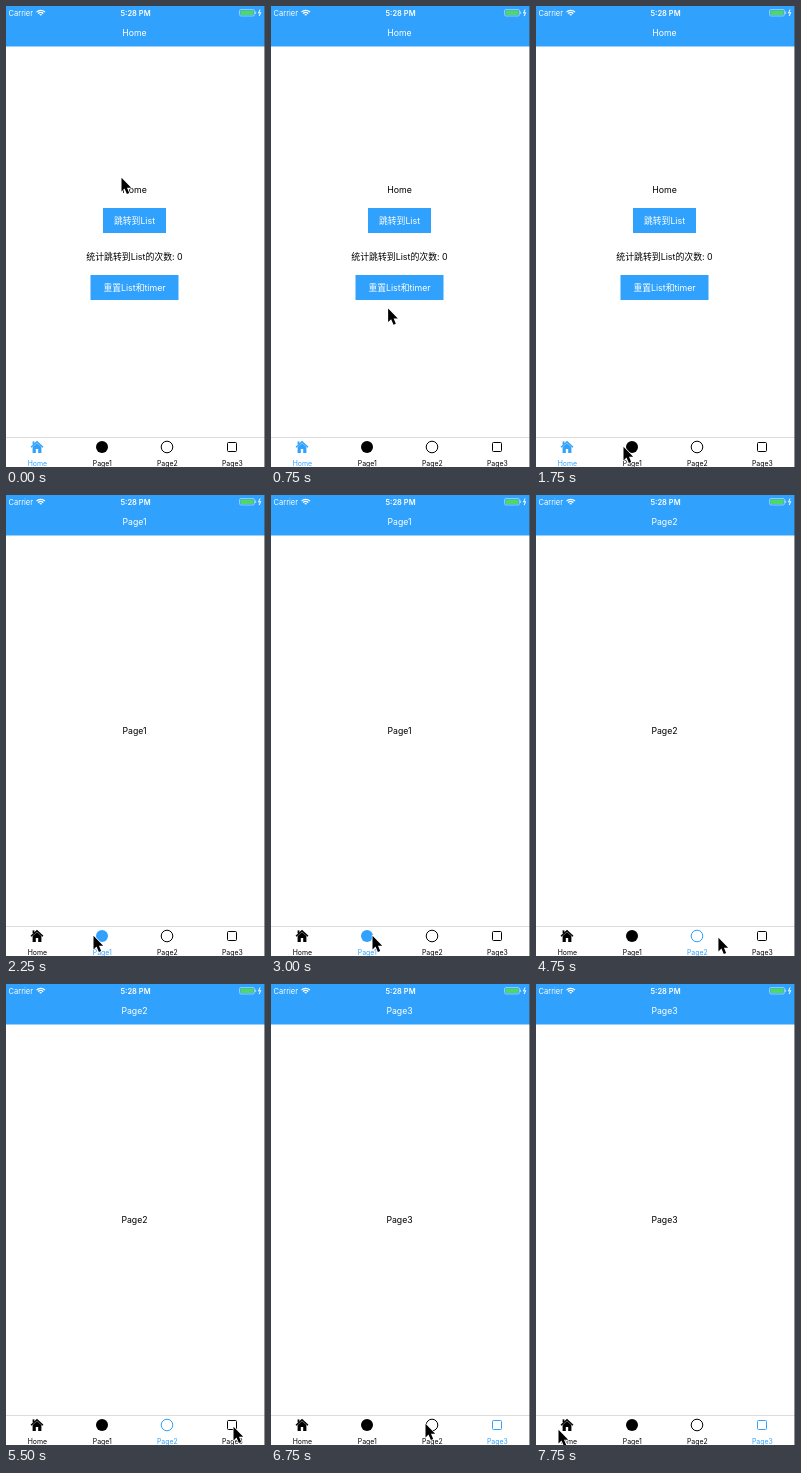
Recreate the animation shown at these times as an HTML page with a canvas. Size 259 px wide and 461 px high, loop 8 s.

```html
<!DOCTYPE html>
<html lang="zh">
<head>
<meta charset="utf-8">
<title>Tab navigation</title>
<style>
html, body { margin: 0; width: 100%; height: 100%; overflow: hidden; background: #fff; }
canvas { display: block; width: 259px; height: 461px; }
</style>
</head>
<body>
<canvas id="stage"></canvas>
<script>
const W = 259, H = 461, LOOP = 8000, STEP = 250;
const BLUE = '#30a1fc', BLACK = '#000', WHITE = '#fff';
const FONT = 'Inter, "Noto Sans CJK SC", "Noto Sans CJK", sans-serif';
const TABS = ['Home', 'Page1', 'Page2', 'Page3'];
const TAB_STARTS = [0, 2250, 4000, 6000];

// The pointer rests between glides; each one eases out to its end point.
const REST = { x: 114, y: 170 };
const GLIDES = [
  { from: 0, to: 250, x: 134, y: 215 },
  { from: 500, to: 1500, x: 86, y: 439 },
  { from: 2750, to: 3000, x: 100, y: 439 },
  { from: 3000, to: 3500, x: 153, y: 441 },
  { from: 4500, to: 5500, x: 226, y: 441 },
  { from: 6500, to: 6750, x: 153, y: 438 },
  { from: 6750, to: 7000, x: 61, y: 438 },
  { from: 7250, to: 7750, x: 21, y: 444 }
];

const canvas = document.getElementById('stage');
const ctx = canvas.getContext('2d');
const dpr = window.devicePixelRatio || 1;
canvas.width = Math.round(W * dpr);
canvas.height = Math.round(H * dpr);

const easeOut = u => Math.sin(Math.min(Math.max(u, 0), 1) * Math.PI / 2);

function pointerAt(t) {
  return GLIDES.reduce((p, g) => {
    const k = easeOut((t - g.from) / (g.to - g.from));
    return { x: p.x + (g.x - p.x) * k, y: p.y + (g.y - p.y) * k };
  }, REST);
}

function rect(x, y, w, h, color) {
  ctx.fillStyle = color;
  ctx.fillRect(x, y, w, h);
}

function text(str, x, y, size, color, align = 'center', weight = 400) {
  ctx.font = `${weight} ${size}px ${FONT}`;
  ctx.textAlign = align;
  ctx.fillStyle = color;
  ctx.fillText(str, x, y);
}

function line(...points) {
  ctx.beginPath();
  points.forEach(([x, y]) => ctx.lineTo(x, y));
}

function circle(x, y, r) {
  ctx.beginPath();
  ctx.arc(x, y, r, 0, Math.PI * 2);
}

function wifi(x, y) {
  ctx.strokeStyle = WHITE;
  ctx.lineWidth = 1.3;
  for (let r = 1.3; r < 6; r += 2.2) {
    ctx.beginPath();
    ctx.arc(x, y, r, -Math.PI * 0.76, -Math.PI * 0.24);
    ctx.stroke();
  }
}

function battery(x, y) {
  ctx.strokeStyle = '#b4dcff';
  ctx.lineWidth = 0.7;
  ctx.beginPath();
  ctx.roundRect(x, y, 15, 6.5, 1.5);
  ctx.stroke();
  rect(x + 1, y + 1, 13, 4.5, '#4fd964');
  rect(x + 15.7, y + 2, 0.9, 2.5, '#b4dcff');
  ctx.strokeStyle = WHITE;
  ctx.lineWidth = 1;
  line([x + 20.6, y], [x + 19, y + 3.6], [x + 21.2, y + 3.1], [x + 19.6, y + 6.6]);
  ctx.stroke();
}

function header(title) {
  rect(0, 0, W, 40.5, BLUE);
  text('Carrier', 2.5, 10, 7.5, WHITE, 'left');
  wifi(34.7, 10);
  text('5:28 PM', 129.5, 10, 7.5, WHITE, 'center', 600);
  battery(233.5, 3.5);
  text(title, 128.5, 30, 8.7, WHITE);
}

function button(label, y, w) {
  rect(128.5 - w / 2, y, w, 25, BLUE);
  text(label, 128.5, y + 15.5, 8.8, WHITE);
}

function homePage() {
  text('Home', 128.5, 186.5, 8.8, BLACK);
  button('跳转到List', 202, 63);
  text('统计跳转到List的次数: 0', 128.5, 254, 8.9, BLACK);
  button('重置List和timer', 269, 88);
}

function house() {
  ctx.lineWidth = 1.4;
  line([-6, 0.2], [0, -5.3], [6, 0.2]);
  ctx.stroke();
  ctx.fillRect(-4.4, -5.6, 1.8, 3);
  line([0, -4], [4.4, 0], [4.4, 6], [-4.4, 6], [-4.4, 0]);
  ctx.fill();
  rect(-1.2, 2, 2.4, 4, WHITE);
}

function disc() {
  circle(0, 0, 6);
  ctx.fill();
}

function ring() {
  circle(0, 0, 5.8);
  ctx.stroke();
}

function square() {
  ctx.beginPath();
  ctx.roundRect(-4.5, -4.5, 9, 9, 1);
  ctx.stroke();
}

const ICONS = [house, disc, ring, square];

function tabBar(selected) {
  rect(0, 431, W, 1, '#dcdcdc');
  TABS.forEach((name, i) => {
    const x = 31 + i * 65;
    const color = i === selected ? BLUE : BLACK;
    ctx.save();
    ctx.translate(x, 441);
    ctx.fillStyle = ctx.strokeStyle = color;
    ctx.lineWidth = 1;
    ICONS[i]();
    ctx.restore();
    text(name, x + 0.3, 459.7, 6.9, color);
  });
}

function pointer({ x, y }) {
  ctx.save();
  ctx.translate(x + 1, y + 1);
  ctx.lineJoin = 'round';
  line([0.5, 0.8], [0.5, 14.4], [3.5, 11.6], [5.9, 17], [8.2, 16], [6, 10.7], [10.2, 10.7]);
  ctx.closePath();
  ctx.strokeStyle = WHITE;
  ctx.lineWidth = 1.4;
  ctx.stroke();
  ctx.fillStyle = BLACK;
  ctx.fill();
  ctx.restore();
}

function draw(now) {
  const t = Math.floor(now % LOOP / STEP) * STEP;
  const page = TAB_STARTS.findLastIndex(start => start <= t);
  ctx.setTransform(dpr, 0, 0, dpr, 0, 0);
  rect(0, 0, W, H, WHITE);
  header(TABS[page]);
  if (page === 0) homePage();
  else text(TABS[page], 128.5, 239, 8.7, BLACK);
  tabBar(page);
  rect(258, 0, 1, H, 'rgba(70,70,70,.6)');
  pointer(pointerAt(t));
}

const start = performance.now();
function tick() {
  draw(performance.now() - start);
  requestAnimationFrame(tick);
}
tick();
</script>
</body>
</html>
```
